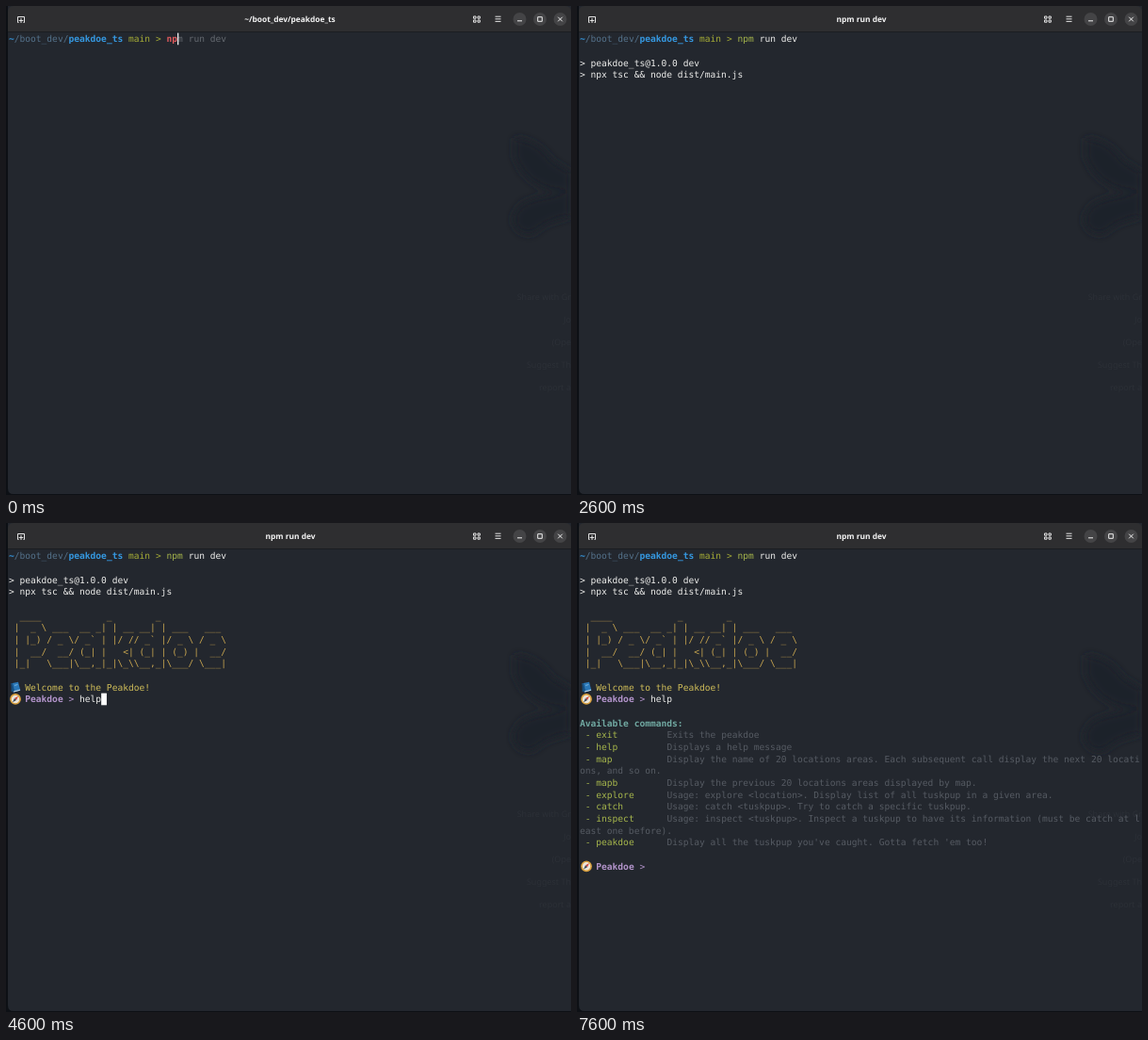
These frames come from a looping animation (600x519 px, 8000 ms). An HTML page:

```html
<!DOCTYPE html>
<html lang="en">
<head>
<meta charset="utf-8">
<title>Terminal</title>
<style>
  html, body { margin: 0; width: 100%; height: 100%; overflow: hidden; background: #0d1015; }
  svg { display: block; width: 600px; height: 519px; }
  text { white-space: pre; text-rendering: geometricPrecision; }
  #screen text { font: 9.6px "DejaVu Sans Mono", monospace; }
  #screen .b { font-weight: bold; }
  #bar text { font: bold 8.4px "Noto Sans", sans-serif; text-anchor: middle; fill: #f4f4f4; }
  #ghost text { font: 9px "Noto Sans", sans-serif; fill: #2c3037; text-anchor: end; }
</style>
</head>
<body>
<svg id="stage" viewBox="0 0 600 519" xmlns="http://www.w3.org/2000/svg">
  <defs>
    <filter id="soft"><feGaussianBlur stdDeviation="4"/></filter>
    <g id="book">
      <path d="M1.5 2 9 .6 11.3 9.6 4 11.6Z" fill="#2b78b8"/>
      <path d="M1.5 2 3 1.7 5.3 11.2 4 11.6 1.6 10.5Z" fill="#174f80"/>
      <path d="M4 10.8 11 8.9" stroke="#dfe8ee" stroke-width=".9"/>
      <path d="M5 4.1 8.4 3.3" stroke="#79b6e2" stroke-width="1"/>
    </g>
    <g id="compass">
      <circle cx="6" cy="6" r="5.1" fill="#ece6da" stroke="#d9a03e" stroke-width="1.6"/>
      <path d="M9 2.8 7 7 5 5Z" fill="#d0453c"/>
      <path d="M3 9.2 5 5 7 7Z" fill="#39485a"/>
    </g>
  </defs>
  <rect width="600" height="519" fill="#0d1015"/>
  <path d="M2 0H600V518H8Q2 518 2 512Z" fill="#23272e"/>
  <g id="ghost">
    <g fill="#1d2129" filter="url(#soft)">
      <path d="M540 140Q566 142 580 164L600 176V196L578 196Q548 186 540 160Z"/>
      <path d="M600 196 572 202Q540 206 538 228 542 244 560 242 574 228 600 224Z"/>
    </g>
    <text x="600" y="312">Share with Gr</text>
    <text x="600" y="336">Jo</text>
    <text x="600" y="360">(Ope</text>
    <text x="600" y="384">Suggest Th</text>
    <text x="600" y="408">report a</text>
  </g>
  <g id="bar">
    <path d="M2 27V6Q2 0 8 0H594Q600 0 600 6V27Z" fill="#2e2e30"/>
    <path d="M2 27.5H600" stroke="#1b1d21"/>
    <g fill="none" stroke="#e4e4e4">
      <path d="M13.5 17.5H12.5V11.5H19.5V17.5H18.5M16 13V18M13.7 15.5H18.3"/>
      <path d="M496.5 11H499V13.2H496.5ZM501 11H503.3V13.2H501ZM496.5 15H499V17.2H496.5ZM501 15H503.3V17.2H501Z"/>
      <path d="M519.5 11.2H525.5M519.5 13.8H525.5M519.5 16.4H525.5"/>
    </g>
    <g fill="#444446">
      <circle cx="545.5" cy="14" r="7"/><circle cx="567" cy="14" r="7"/><circle cx="588.5" cy="14" r="7"/>
    </g>
    <path d="M543 15.8H548M564.7 11.7H569.3V16.3H564.7ZM586.2 11.7 590.8 16.3M590.8 11.7 586.2 16.3" fill="none" stroke="#f0f0f0"/>
  </g>
  <g id="screen"></g>
</svg>
<script>
const NS = 'http://www.w3.org/2000/svg';
const LOOP = 8000, LEFT = 2.9, TOP = 28.6, CELL = 5.78, LINE = 12.67;
const bar = document.getElementById('bar');
const screen = document.getElementById('screen');
const timed = [];

const C = {
  white: '#eeeeec', dim: '#565b63', ghost: '#646970', path: '#54718a', blue: '#3598e0',
  olive: '#a5ac36', red: '#df5b5d', green: '#a6b64c', art: '#c9a650', yellow: '#cfbd59',
  purple: '#b394cb', teal: '#71a9a2'
};
const colX = col => LEFT + col * CELL;
const rowY = row => TOP + row * LINE;

// Adds an element that shows while from <= time < to.
function add(parent, tag, attrs, from = 0, to = LOOP, content = '') {
  const el = document.createElementNS(NS, tag);
  for (const key in attrs) el.setAttribute(key, attrs[key]);
  el.textContent = content;
  parent.append(el);
  timed.push({ el, from, to });
}

function write(row, col, content, color, from, to, bold) {
  if (!content) return;
  add(screen, 'text', {
    x: colX(col), y: rowY(row) + 9.8, fill: C[color], class: bold ? 'b' : ''
  }, from, to, content);
}

function cursor(row, col, from, to, width = CELL) {
  add(screen, 'rect', {
    x: colX(col), y: rowY(row), width, height: LINE, fill: '#fff'
  }, from, to);
}

function icon(name, row, from) {
  add(screen, 'use', { href: '#' + name, x: 4, y: rowY(row) + .3 }, from);
}

function replPrompt(row, from) {
  icon('compass', row, from);
  write(row, 3, 'Peakdoe', 'purple', from, LOOP, true);
  write(row, 11, '>', 'purple', from);
}

// Window title
add(bar, 'text', { x: 301.5, y: 17 }, 0, 2600, '~/boot_dev/peakdoe_ts');
add(bar, 'text', { x: 302, y: 17 }, 2600, LOOP, 'npm run dev');

// Shell prompt and typed command with its suggestion
write(0, 0, '~', 'blue', 0, LOOP, true);
write(0, 1, '/boot_dev/', 'path');
write(0, 11, 'peakdoe_ts', 'blue', 0, LOOP, true);
write(0, 22, 'main >', 'olive');

const command = 'npm run dev', commandCol = 29;
const keys = [[0, 2], [200, 4], [400, 5], [600, 7], [1000, 10], [1200, 11], [1400, 11]];
keys.forEach(([from, count], i) => {
  const last = i === keys.length - 1;
  const to = last ? LOOP : keys[i + 1][0];
  const known = count >= 3;
  write(0, commandCol, command.slice(0, Math.min(count, 3)), known ? 'green' : 'red', from, to, !known);
  write(0, commandCol + 3, command.slice(3, Math.max(count, 3)), 'white', from, to);
  write(0, commandCol + count, command.slice(count), 'ghost', from, to);
  if (!last) cursor(0, commandCol + count, from, to, 1.2);
});
cursor(1, 0, 1400, 2600);

// Script start
write(2, 0, '> peakdoe_ts@1.0.0 dev', 'white', 2600);
write(3, 0, '> npx tsc && node dist/main.js', 'white', 2600);
cursor(5, 0, 3000, 3200);

// Banner and first prompt
String.raw`
  ____            _        _
 |  _ \ ___  __ _| | __ __| | ___   ___
 | |_) / _ \/ _' | |/ // _' |/ _ \ / _ \
 |  __/  __/ (_| |   <| (_| | (_) |  __/
 |_|   \___|\__,_|_|\_\\__,_|\___/ \___|`
  .replaceAll("'", '`').split('\n').slice(1)
  .forEach((line, i) => write(5 + i, 0, line, 'art', 3200));
icon('book', 11, 3200);
write(11, 3, 'Welcome to the Peakdoe!', 'yellow', 3200);
replPrompt(12, 3200);
cursor(12, 13, 3200, 3800);
[[4200, 1, 4400], [4400, 3, 4600], [4600, 4, 5200]].forEach(([from, count, to]) => {
  write(12, 13, 'help'.slice(0, count), 'white', from, to);
  cursor(12, 13 + count, from, to);
});

// Help listing
write(12, 13, 'help', 'white', 5200);
write(14, 0, 'Available commands:', 'teal', 5200, LOOP, true);
const help = [
  ['exit', 'Exits the peakdoe'],
  ['help', 'Displays a help message'],
  ['map', 'Display the name of 20 locations areas. Each subsequent call display the next 20 locations, and so on.'],
  ['mapb', 'Display the previous 20 locations areas displayed by map.'],
  ['explore', 'Usage: explore <location>. Display list of all tuskpup in a given area.'],
  ['catch', 'Usage: catch <tuskpup>. Try to catch a specific tuskpup.'],
  ['inspect', 'Usage: inspect <tuskpup>. Inspect a tuskpup to have its information (must be catch at least one before).'],
  ['peakdoe', "Display all the tuskpup you've caught. Gotta fetch 'em too!"]
];
const indent = 16, columns = 103;
let row = 15;
for (const [name, about] of help) {
  write(row, 1, '- ' + name, 'green', 5200);
  write(row++, indent, about.slice(0, columns - indent), 'dim', 5200);
  const rest = about.slice(columns - indent);
  if (rest) write(row++, 0, rest, 'dim', 5200);
}
replPrompt(26, 5200);
cursor(26, 13, 5800, 6400);
cursor(26, 13, 7000, 7600);

function render(time) {
  for (const { el, from, to } of timed) {
    el.style.display = time >= from && time < to ? '' : 'none';
  }
}

const start = performance.now();
function tick() {
  render((performance.now() - start) % LOOP);
  requestAnimationFrame(tick);
}
tick();
</script>
</body>
</html>
```
